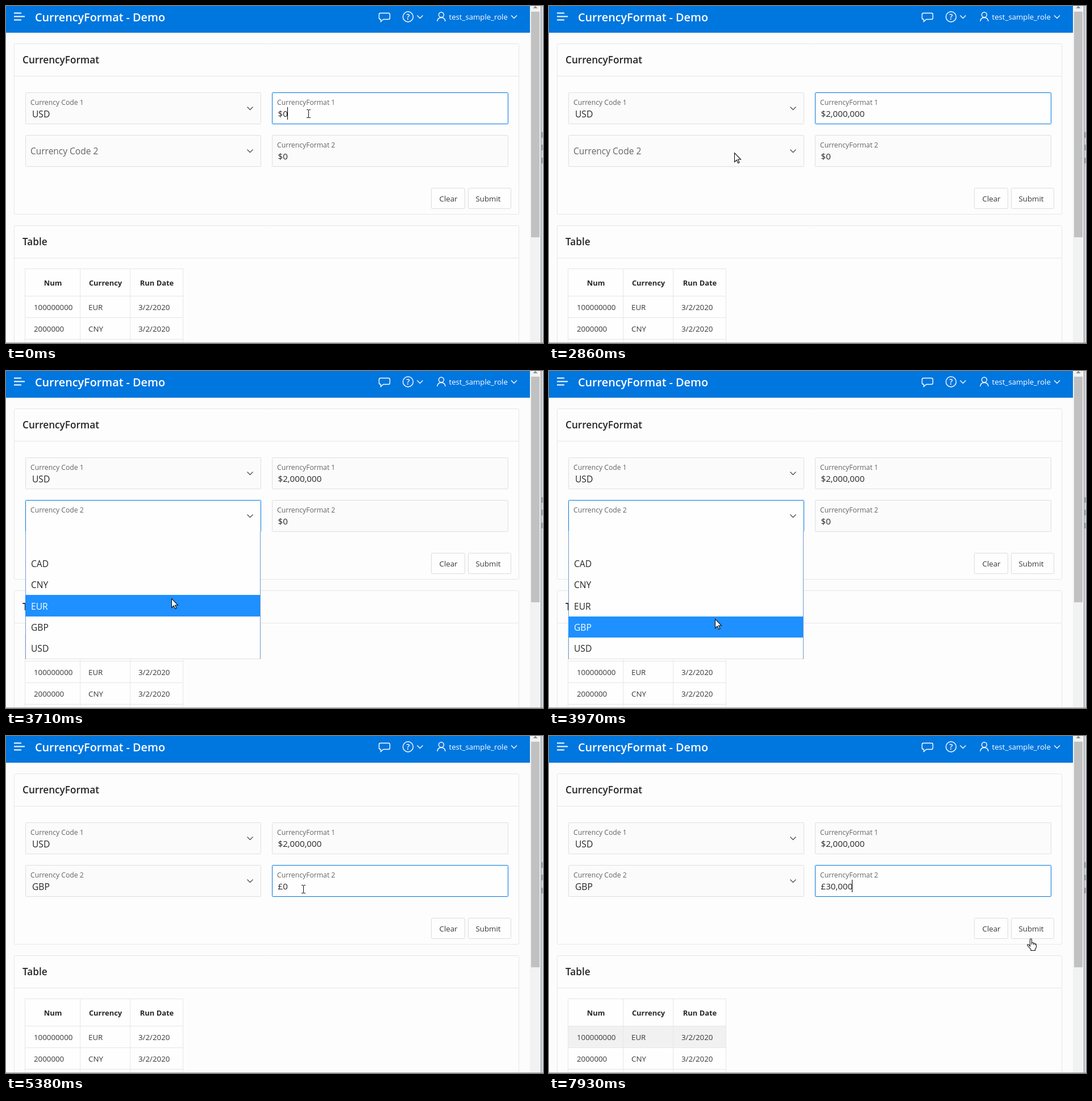
An HTML page with a canvas for the animation above (8000 ms loop, 945 by 593 pixels).

```html
<!DOCTYPE html>
<html lang="en">
<head>
<meta charset="utf-8">
<title>CurrencyFormat - Demo</title>
<style>
  html, body { margin: 0; width: 945px; height: 593px; overflow: hidden; background: #fcfcfc; }
  canvas { display: block; }
</style>
</head>
<body>
<canvas id="stage" width="945" height="593"></canvas>
<script>
const ctx = document.getElementById('stage').getContext('2d');
const LOOP = 8000;
const INK = '#262626', MUTED = '#646464', BLUE = '#0076df', LINE = '#e6e6e6';

// Timelines: each entry holds until the next one starts.
const POINTER = [
  [0, 'beam', 532, 190], [2590, 'arrow', 392, 310], [2710, 'arrow', 321, 296],
  [2860, 'arrow', 326, 258], [3010, 'arrow', 326, 262], [3130, 'arrow', 331, 288],
  [3280, 'arrow', 322, 307], [3430, 'arrow', 312, 335], [3560, 'arrow', 299, 378],
  [3710, 'arrow', 291, 400], [3830, 'arrow', 290, 415], [3970, 'arrow', 292, 436],
  [4100, 'arrow', 300, 444], [4380, 'arrow', 407, 361], [4530, 'arrow', 441, 335],
  [4650, 'arrow', 487, 296], [4770, 'beam', 523, 270], [7690, 'arrow', 285, 545],
  [7810, 'arrow', 560, 470], [7930, 'hand', 841, 356]
];
const AMOUNT_1 = [
  [0, '$0'], [810, '$02'], [940, '$020'], [1080, '$20'], [1200, '$200'], [1350, '$2000'],
  [1470, '$2,000'], [1600, '$20,000'], [1720, '$200,000'], [1870, '$2,000,000']
];
const AMOUNT_2 = [
  [0, '$0'], [4380, '£0'], [5770, '£03'], [5900, '£30'], [6210, '£300'],
  [6340, '£3000'], [6500, '£3,000'], [6620, '£30,000']
];
const FOCUSED = [[0, 'amount1'], [3010, 'code2'], [4930, 'amount2']];
const CARET = [
  [0, true], [280, false], [810, true], [2450, false], [4930, true],
  [5380, false], [5770, true], [7150, false], [7690, true]
];
const HIGHLIGHT = [[0, -1], [3010, 0], [3430, 1], [3560, 2], [3710, 3], [3970, 4], [4380, -1]];
const LABEL_RISE = [[0, 0], [3130, 0.5], [3280, 1]];
const OPTIONS = ['', 'CAD', 'CNY', 'EUR', 'GBP', 'USD'];

const entryAt = (track, t) => track.findLast(([start]) => start <= t);
const valueAt = (track, t) => entryAt(track, t)[1];

function text(str, x, y, size, color = INK, weight = 400, align = 'left') {
  ctx.font = `${weight} ${size}px "Open Sans", "Noto Sans", sans-serif`;
  ctx.fillStyle = color;
  ctx.textAlign = align;
  ctx.fillText(str, x, y);
}

function rect(x, y, w, h, color) {
  ctx.fillStyle = color;
  ctx.fillRect(x, y, w, h);
}

function box(x, y, w, h, border, fill, radius = 2) {
  ctx.beginPath();
  ctx.roundRect(x + 0.5, y + 0.5, w - 1, h - 1, radius);
  ctx.fillStyle = fill;
  ctx.fill();
  ctx.strokeStyle = border;
  ctx.lineWidth = 1;
  ctx.stroke();
}

function stroke(d, color, width = 1.4) {
  ctx.strokeStyle = color;
  ctx.lineWidth = width;
  ctx.stroke(new Path2D(d));
}

const chevron = (x, y, color) => stroke(`M${x - 5} ${y - 2.5} l5 5 l5 -5`, color, 1.3);

function header() {
  rect(0, 0, 922, 47, BLUE);
  stroke('M14 12.5 H27 M14 18.5 H33 M14 24.5 H27', '#fff', 1.8);
  text('CurrencyFormat - Demo', 51, 27, 19.8, '#fff', 600);
  stroke('M659 12.5 H673 Q675.5 12.5 675.5 15 V21 Q675.5 23.5 673 23.5 H664 L659.5 27.5 V23.5 Q656.5 23.5 656.5 21 V15 Q656.5 12.5 659 12.5 Z', '#fff');
  stroke('M698.5 19 a9 9 0 1 0 18 0 a9 9 0 1 0 -18 0 Z', '#fff');
  text('?', 707.5, 24, 13.5, '#fff', 600, 'center');
  chevron(728.5, 19, '#fff');
  stroke('M761.5 15.5 a4.5 4.5 0 1 0 9 0 a4.5 4.5 0 1 0 -9 0 Z M759 27 Q759.5 20.5 766 20.5 Q772.5 20.5 773 27', '#fff');
  text('test_sample_role', 779.5, 24, 13.2, '#fff');
  chevron(894, 19, '#fff');
}

function windowEdge() {
  rect(922, 0, 19, 593, '#f2f2f2');
  rect(924, 10, 15, 397, '#c1c1c1');
  ctx.fillStyle = '#8a8a8a';
  ctx.fill(new Path2D('M927.5 4 L931.5 0 L935.5 4 Z'));
  rect(941, 0, 1, 593, '#81858a');
  rect(942, 0, 3, 593, '#d5d9dd');
  for (const y of [222, 244, 267]) rect(942, y, 3, 10, '#a4a9ae');
  rect(0, 592, 945, 1, '#a0a0a0');
}

function region(title, y, h) {
  box(14, y, 889, h, LINE, '#fdfdfd');
  rect(15, y + 57, 887, 1, LINE);
  text(title, 29, y + 35, 17.2, INK, 600);
}

function field(x, y, w, focused) {
  box(x, y, w, 56, focused ? BLUE : '#dfdfdf', focused ? '#fefefe' : '#fbfbfb', 1);
}

function selectField(y, label, value, focused, rise = 1) {
  field(34, y, 415, focused);
  text(label, 43, y + 34 - 12.5 * rise, 15.5 - 3.3 * rise, MUTED);
  text(value, 46, y + 44, 15.6);
  chevron(429.5, y + 28, '#505050');
}

function amountField(y, label, value, focused, caretOn) {
  field(468, y, 416, focused);
  text(label, 477, y + 21.5, 12.2, MUTED);
  text(value, 478.5, y + 43, 15.2);
  if (focused && caretOn) {
    rect(Math.floor(478 + ctx.measureText(value).width), y + 26, 1, 22, '#000');
  }
}

function button(label, x, w, textX) {
  box(x, 320, w, 37, '#dcdcdc', '#fefefe');
  text(label, textX, 344, 13.3, '#383838');
}

function table(hovered) {
  rect(34, 463, 278, 130, '#fefefe');
  if (hovered) rect(34, 511, 278, 37, '#f1f1f1');
  for (const y of [462, 510, 548, 586]) rect(33, y, 279, 1, LINE);
  for (const x of [33, 130, 218, 311]) rect(x, 462, 1, 130, LINE);
  [['Num', 82.5], ['Currency', 175], ['Run Date', 265.5]]
    .forEach(([name, x]) => text(name, x, 492, 12.9, INK, 700, 'center'));
  [['100000000', 'EUR'], ['2000000', 'CNY']].forEach(([num, code], i) => {
    const y = 535 + 38 * i;
    text(num, 49, y, 13.3, '#383838');
    text(code, 145, y, 13.3, '#383838');
    text('3/2/2020', 233, y, 13.3, '#383838');
  });
}

function dropdown(active) {
  const edge = i => Math.floor(282 + 37.5 * i);
  rect(34, 282, 414, 225, '#fefefe');
  rect(34, 506, 414, 1, '#e2e2e2');
  rect(34, 282, 1, 225, '#6f9bd0');
  rect(447, 282, 1, 225, '#6f9bd0');
  rect(34, edge(active), 413, edge(active + 1) - edge(active), '#1e90ff');
  OPTIONS.forEach((name, i) => {
    text(name, 44, Math.round(307.4 + 37.4 * i), 15.6, i === active ? '#fff' : INK);
  });
}

function pointer([, kind, x, y]) {
  ctx.save();
  ctx.translate(x, y);
  if (kind === 'beam') {
    stroke('M-3 -7.5 H0 M1 -7.5 H4 M.5 -7 V6.5 M-3 6.5 H0 M1 6.5 H4', '#111', 1);
  } else {
    const shape = new Path2D(kind === 'arrow'
      ? 'M.5 .5 V16.5 L4.2 13 L6.8 18.5 L9 17.5 L6.5 12 H11.5 Z'
      : 'M5.5 14 V2.5 Q5.5 .8 7 .8 Q8.5 .8 8.5 2.5 V8 Q11.2 6.6 11.5 9 Q14 7.7 14.3 10 Q16.5 9.4 16.5 11.5 V15 Q16.5 17 14.5 19 V21.5 H7 V19.5 L1 12.8 Q.3 11 2 10.8 Q3.3 10.8 5.5 14 Z');
    ctx.fillStyle = '#fff';
    ctx.fill(shape);
    ctx.strokeStyle = '#111';
    ctx.lineWidth = 1.1;
    ctx.stroke(shape);
    if (kind === 'hand') stroke('M8.5 8 V11 M11.5 9 V11.5 M14.3 10 V12', '#111', 1);
  }
  ctx.restore();
}

function draw(t) {
  const focus = valueAt(FOCUSED, t);
  const caretOn = valueAt(CARET, t);
  const active = valueAt(HIGHLIGHT, t);

  rect(0, 0, 945, 593, '#fcfcfc');
  header();
  region('CurrencyFormat', 66, 301);
  region('Table', 386, 220);
  selectField(152, 'Currency Code 1', 'USD', false);
  selectField(227, 'Currency Code 2', t >= 4380 ? 'GBP' : '', focus === 'code2', valueAt(LABEL_RISE, t));
  amountField(152, 'CurrencyFormat 1', valueAt(AMOUNT_1, t), focus === 'amount1', caretOn);
  amountField(227, 'CurrencyFormat 2', valueAt(AMOUNT_2, t), focus === 'amount2', caretOn);
  button('Clear', 748, 60, 762.5);
  button('Submit', 813, 76, 826.5);
  table(t >= 7690);
  if (active >= 0) dropdown(active);
  windowEdge();
  pointer(entryAt(POINTER, t));
}

const startTime = performance.now();
function tick() {
  draw((performance.now() - startTime) % LOOP);
  requestAnimationFrame(tick);
}
tick();
</script>
</body>
</html>
```
